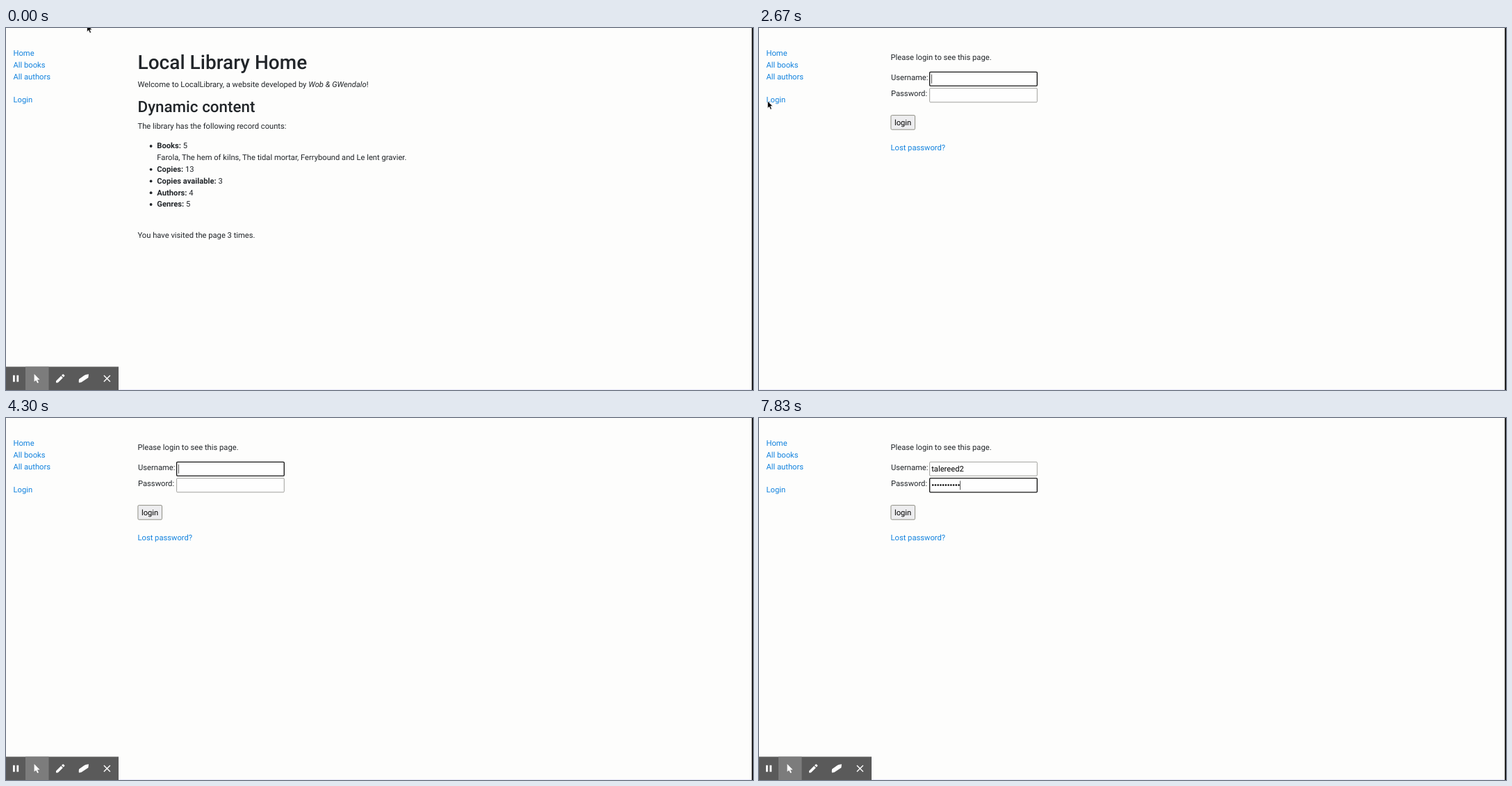
These frames come from a looping animation (1075 by 521 pixels, 8000 ms). An HTML page:

```html
<!DOCTYPE html>
<html lang="en">
<head>
<meta charset="utf-8">
<title>Local Library</title>
<style>
  html, body { margin: 0; width: 100%; height: 100%; overflow: hidden; background: #fdfdfc; }
  svg { display: block; width: 1075px; height: 521px; }
  text { font: 11.2px Roboto, sans-serif; fill: #212529; white-space: pre; text-rendering: geometricPrecision; }
  .h1 { font-size: 28px; font-weight: 500; }
  .h2 { font-size: 22.4px; font-weight: 500; }
  .link { fill: #1182de; }
  .b { font-weight: 700; }
  .i { font-style: italic; }
  .ink { fill: #000; }
</style>
</head>
<body>
<svg viewBox="0 0 1075 521" xmlns="http://www.w3.org/2000/svg">
  <rect width="1075" height="521" fill="#fdfdfc"/>
  <rect y="520" width="1075" height="1" fill="#e9e9fa"/>
  <rect x="1073.3" width="1.7" height="521" fill="#0a0a0a"/>

  <text class="link" x="10.5" y="40.2">Home</text>
  <text class="link" x="10.5" y="57">All books</text>
  <text class="link" x="10.5" y="73.8">All authors</text>
  <text class="link" x="10.5" y="107.4">Login</text>

  <g id="home">
    <text class="h1" x="189.5" y="59.4">Local Library Home</text>
    <text x="189.5" y="85">Welcome to LocalLibrary, a website developed by <tspan class="i">Wob &amp; GWendalo</tspan>!</text>
    <text class="h2" x="189.5" y="121.4">Dynamic content</text>
    <text x="189.5" y="145.4">The library has the following record counts:</text>
    <g id="list"></g>
    <text x="217.3" y="190.2">Farola, The hem of kilns, The tidal mortar, Ferrybound and Le lent gravier.</text>
    <text id="visits" x="189.5" y="302"></text>
  </g>

  <g id="login">
    <text x="189.5" y="46">Please login to see this page.</text>
    <text x="190" y="74.6">Username:</text>
    <text x="190" y="98">Password:</text>
    <rect id="userBox" x="245.6" y="63.3" rx="1.2" width="154.7" height="20" fill="#fefefe"/>
    <rect id="passBox" x="245.6" y="86.6" rx="1.2" width="154.7" height="20.2" fill="#fefefe"/>
    <text id="user" class="ink" x="248.2" y="77.2"></text>
    <g id="dots"></g>
    <rect id="caret" width="0.8" height="13" fill="#333"/>
    <rect x="189.9" y="125.6" rx="1.5" width="34.6" height="20.6" fill="#ededef" stroke="#85857a" stroke-width=".9"/>
    <text class="ink" x="207.1" y="139.8" text-anchor="middle">login</text>
    <text class="link" x="189.5" y="175.6">Lost password?</text>
  </g>

  <g id="toolbar">
    <rect y="487.5" width="162" height="33.5" fill="#5a5a5a"/>
    <rect x="28" y="487.5" width="33.5" height="33.5" fill="#7c7c7c"/>
    <g fill="#fff">
      <path d="M10 499.8h2.8v9.4h-2.8zM15.4 499.8h2.8v9.4h-2.8z"/>
      <path d="M40.6 498v11l2.6-2.1 2 4.2 1.8-.9-2-4h3.6z"/>
      <path d="M72 510.6v-2.6l7.2-7.2 2.6 2.6-7.2 7.2zM80 500l1.5-1.5q.7-.6 1.4 0l1.2 1.2q.6.7 0 1.4l-1.5 1.5z"/>
      <path d="M105.2 505.2l7.4-5.2q1.6-1.1 3.2-1.3l3.2-.4-.6 5-9 5.9q-1.3.9-2.8 1.1l-1.6.3q-.6-3 .2-5.4z"/>
    </g>
    <path d="M140.9 500l9 9m0-9l-9 9" stroke="#fff" stroke-width="1.4"/>
  </g>

  <path id="arrow" d="M0 0V10.2L2.4 8.1 4.1 12 5.9 11.2 4.2 7.4H7.4z" fill="#000" stroke="#fff" stroke-width=".6"/>
  <path id="beam" d="M-2.6-5.6h2l.6.7.6-.7h2M-2.6 5.6h2l.6-.7.6.7h2M0-5V5M-1.3 2.4h2.6" fill="none" stroke="#555" stroke-width=".9"/>
</svg>

<script>
const LOOP = 8000;
const $ = id => document.getElementById(id);
const NS = 'http://www.w3.org/2000/svg';
const NAME = 'talereed2';
const LOGIN_AT = 2670, PASS_AT = 5830, BEAM_END = 4300;
const RELOADS = [900, 1400, 1730];
const NAME_KEYS = [4370, 4430, 4500, 4730, 4830, 4970, 5100, 5300, 5500];
const PASS_KEYS = [6370, 6570, 6730, 6930, 7100, 7170, 7330, 7470, 7630, 7770, 7830];
const TOOLBAR_OFF = [[900, 1200], [1400, 2300], [2670, 3300]];
const PATH = [
  [1430, 116.6, -4.8], [1700, 72, 58], [1970, 12.4, 105.2], [2670, 12.4, 105.2],
  [3000, 334, 104], [3130, 334, 104], [3570, 370, 90], [3900, 350, 75]
];
const DOT = 3.73, FIELD_X = 248.2;

function add(parent, tag, attrs, text) {
  const el = document.createElementNS(NS, tag);
  for (const k in attrs) el.setAttribute(k, attrs[k]);
  if (text) el.textContent = text;
  parent.appendChild(el);
  return el;
}

[['Books:', 5], ['Copies:', 13], ['Copies available:', 3], ['Authors:', 4], ['Genres:', 5]]
  .forEach(([label, n], i) => {
    const y = 173.4 + 16.8 * (i ? i + 1 : 0);
    add($('list'), 'circle', { cx: 208.6, cy: y - 3.4, r: 1.9, fill: '#212529' });
    const row = add($('list'), 'text', { x: 217.3, y });
    add(row, 'tspan', { class: 'b' }, label);
    add(row, 'tspan', {}, ' ' + n);
  });

const dots = PASS_KEYS.map((_, i) =>
  add($('dots'), 'circle', { cx: 250.2 + DOT * i, cy: 96.6, r: 1.25 }));

const passed = (times, t) => times.filter(k => t >= k).length;
const show = (el, on) => el.setAttribute('display', on ? 'inline' : 'none');
const ease = u => u * u * (3 - 2 * u);

function pointer(t) {
  const i = passed(PATH.map(p => p[0]), t);
  if (i === 0) return PATH[0].slice(1);
  if (i === PATH.length) return PATH[i - 1].slice(1);
  const [t0, x0, y0] = PATH[i - 1], [t1, x1, y1] = PATH[i];
  const u = ease((t - t0) / (t1 - t0));
  return [x0 + (x1 - x0) * u, y0 + (y1 - y0) * u];
}

function focus(box, on) {
  box.setAttribute('stroke', on ? '#161616' : '#8a8a84');
  box.setAttribute('stroke-width', on ? 1.35 : 0.8);
}

function draw(t) {
  const onLogin = t >= LOGIN_AT, inPass = t >= PASS_AT;
  show($('home'), !onLogin);
  show($('login'), onLogin);
  show($('toolbar'), !TOOLBAR_OFF.some(([a, b]) => t >= a && t < b));
  $('visits').textContent = `You have visited the page ${3 + passed(RELOADS, t)} times.`;

  if (onLogin) {
    const typed = NAME.slice(0, passed(NAME_KEYS, t));
    const count = passed(PASS_KEYS, t);
    $('user').textContent = typed;
    dots.forEach((d, i) => show(d, i < count));
    focus($('userBox'), !inPass);
    focus($('passBox'), inPass);
    const w = inPass ? DOT * count : typed ? $('user').getComputedTextLength() : 0;
    $('caret').setAttribute('x', FIELD_X + w);
    $('caret').setAttribute('y', inPass ? 90.4 : 66.8);
  }

  const [x, y] = pointer(t);
  const inField = onLogin && x > 245;
  show($('arrow'), t < BEAM_END && !inField);
  show($('beam'), t < BEAM_END && inField);
  for (const id of ['arrow', 'beam']) $(id).setAttribute('transform', `translate(${x} ${y})`);
}

function tick() {
  draw(performance.now() % LOOP);
  requestAnimationFrame(tick);
}
tick();
</script>
</body>
</html>
```
